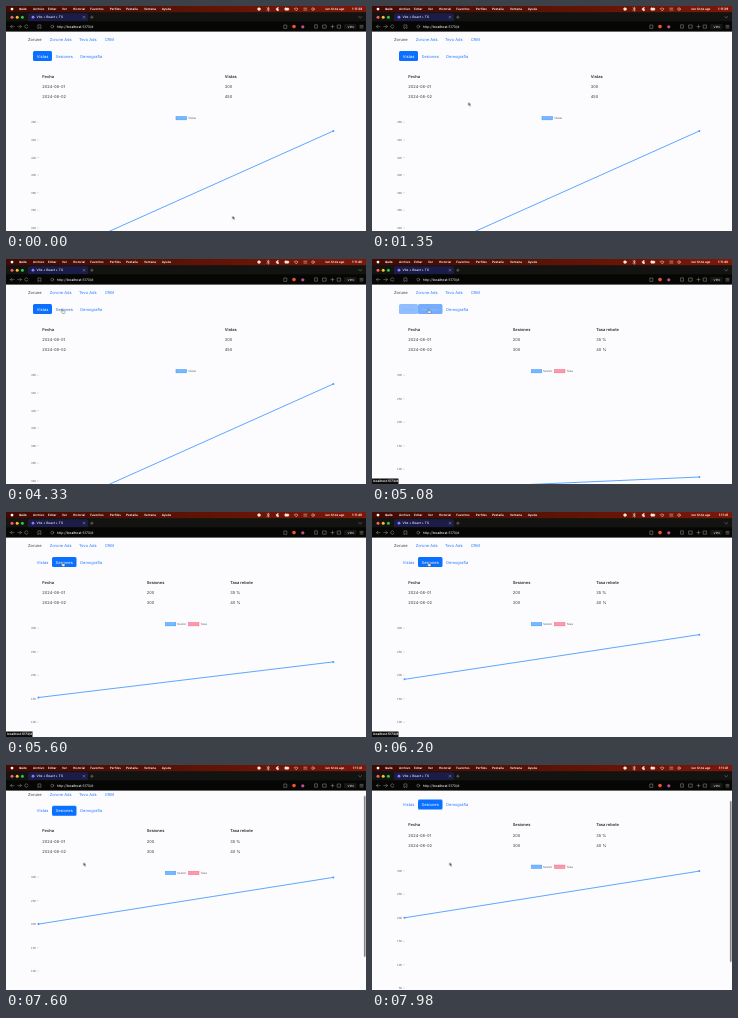
Recreate the animation shown at these times as an HTML page. Size 360 px wide and 225 px high, loop 8000 ms.

```html
<!DOCTYPE html>
<html lang="es">
<head>
<meta charset="utf-8">
<title>Panel</title>
<style>
html, body { margin: 0; height: 100%; overflow: hidden; background: #fcfcff; }
svg.stage { display: block; width: 100vw; height: 100vh; }
text { font: 4px Inter, "Open Sans", sans-serif; fill: #33373b; text-rendering: geometricPrecision; }
.link { fill: #2478fa; }
.head text { font-weight: 600; fill: #24282c; }
.chart text { font: 3px "Liberation Sans", sans-serif; fill: #666; }
.axis text { text-anchor: end; }
.axis path { stroke: #b5b5b5; stroke-width: .4; }
.bar text { font-size: 3px; font-weight: 600; fill: #fff; }
.bar .app { font-weight: 700; }
.line { fill: none; stroke: #4b9dff; stroke-width: .9; stroke-linecap: round; }
.dot { stroke-width: 2; }
.icons { fill: none; stroke: #96968f; stroke-width: .5; stroke-linecap: round; }
.bar .icons { stroke: #ffe6e0; }

/* one shared 8 s clock: 1% = 80 ms */
.anim, .anim * { animation-duration: 8s; animation-iteration-count: infinite; animation-timing-function: linear; }
.anim .step { animation-timing-function: step-end; }

.anim .page { animation-name: scroll; }
@keyframes scroll { 0%, 92% { transform: translateY(0); } 99.5%, 100% { transform: translateY(-10.5px); } }
.anim .thumb { animation-name: thumb; }
@keyframes thumb {
  0%, 91.9% { opacity: 0; transform: translateY(0); }
  92% { opacity: 1; transform: translateY(0); }
  99.5%, 100% { opacity: 1; transform: translateY(8.5px); }
}
.anim .views { animation-name: views; }
@keyframes views { 0% { visibility: visible; } 61%, 100% { visibility: hidden; } }
.anim .sessions { animation-name: sessions; }
@keyframes sessions { 0% { visibility: hidden; } 61%, 100% { visibility: visible; } }

/* both ends of the line rise from the zero level */
.anim .rise { animation-name: rise; }
.anim .riseDots { animation-name: riseDots; }
@keyframes rise {
  0% { d: path("M32.5 257L327.3 257"); }
  61.25% { d: path("M32.5 257L327.3 257"); animation-timing-function: cubic-bezier(.25, 1, .5, 1); }
  90.5%, 100% { d: path("M32.5 163.3L327.3 116.6"); }
}
@keyframes riseDots {
  0% { d: path("M32.5 257h.01M327.3 257h.01"); }
  61.25% { d: path("M32.5 257h.01M327.3 257h.01"); animation-timing-function: cubic-bezier(.25, 1, .5, 1); }
  90.5%, 100% { d: path("M32.5 163.3h.01M327.3 116.6h.01"); }
}

.anim .pill1 { animation-name: pillOut; }
.anim .pill2 { animation-name: pillIn; }
.anim .label1 { animation-name: labelOut; }
.anim .label2 { animation-name: labelIn; }
@keyframes pillOut { 0%, 61% { opacity: 1; } 65.5%, 100% { opacity: 0; } }
@keyframes pillIn { 0%, 61% { opacity: 0; } 65.5%, 100% { opacity: 1; } }
@keyframes labelOut { 0%, 61% { fill: #fff; } 65.5%, 100% { fill: #2478fa; } }
@keyframes labelIn { 0%, 41% { fill: #2478fa; } 44%, 61% { fill: #2f66b4; } 65.5%, 100% { fill: #fff; } }

.anim .status { animation-name: status; }
@keyframes status { 0% { visibility: hidden; } 56% { visibility: visible; } 89%, 100% { visibility: hidden; } }

.anim .clock { animation-name: clock; }
@keyframes clock {
  0% { transform: translateY(0); }
  15% { transform: translateY(-10px); }
  45% { transform: translateY(-20px); }
  75%, 100% { transform: translateY(-30px); }
}

.anim .cursor { animation-name: move; }
@keyframes move {
  0% { transform: translate(226.5px, 210px); }
  3.5%, 6.6% { transform: translate(211px, 189px); }
  8.6%, 11.6% { transform: translate(118px, 110px); }
  20.9%, 22.1% { transform: translate(80px, 86px); }
  27.6%, 35.5% { transform: translate(60.5px, 67px); }
  42.5% { transform: translate(56px, 50px); }
  54%, 78% { transform: translate(55.5px, 49.8px); }
  84.5% { transform: translate(75.5px, 93.5px); }
  91%, 100% { transform: translate(77.5px, 97.5px); }
}
.anim .arrow { animation-name: arrow; }
.anim .hand { animation-name: hand; }
@keyframes arrow { 0% { visibility: visible; } 40% { visibility: hidden; } 79%, 100% { visibility: visible; } }
@keyframes hand { 0% { visibility: hidden; } 40% { visibility: visible; } 79%, 100% { visibility: hidden; } }
</style>
</head>
<body>
<svg class="stage anim" viewBox="0 0 360 225" preserveAspectRatio="none">
  <defs>
    <linearGradient id="wine"><stop stop-color="#420903"/><stop offset=".5" stop-color="#5c1305"/><stop offset="1" stop-color="#7e1708"/></linearGradient>
  </defs>
  <rect width="360" height="225" fill="#fcfcff"/>

  <g class="page">
    <text x="22" y="35.4">Zorune</text>
    <g>
      <text class="link" x="43.7" y="35.4">Zorune Ads</text>
      <text class="link" x="73" y="35.4">Tevu Ads</text>
      <text class="link" x="98.7" y="35.4">CRM</text>
    </g>
    <rect class="pill1" x="27" y="45" width="19" height="10" rx="1.5" fill="#0a70ff"/>
    <rect class="pill2" x="46" y="45" width="24.5" height="10" rx="1.5" fill="#0a70ff"/>
    <text class="label1" x="36.6" y="51.5" text-anchor="middle">Vistas</text>
    <text class="label2" x="58.2" y="51.5" text-anchor="middle">Sesiones</text>
    <text class="link" x="74.2" y="51.5">Demografía</text>

    <g class="head"><text x="36.3" y="71.6">Fecha</text></g>
    <text x="36.3" y="82">2024-08-01</text>
    <text x="36.3" y="92.4">2024-08-02</text>

    <g class="views step">
      <g class="head"><text x="218.7" y="71.6">Vistas</text></g>
      <text x="218.7" y="82">300</text>
      <text x="218.7" y="92.4">450</text>
      <g class="chart">
        <rect x="170" y="110.6" width="10.5" height="3.2" fill="#76b8fc" stroke="#4b9dff" stroke-width=".6"/>
        <text x="182" y="113.2">Vistas</text>
        <g class="axis" data-top="460" data-step="20" data-gap="17.6" data-count="7"></g>
        <path class="line" d="M32.5 257L327.3 125"/>
        <path class="line dot" d="M327.3 125h.01"/>
      </g>
    </g>

    <g class="sessions step">
      <g class="head"><text x="140.7" y="71.6">Sesiones</text><text x="224.2" y="71.6">Tasa rebote</text></g>
      <text x="140.7" y="82">200</text><text x="224.2" y="82">35 %</text>
      <text x="140.7" y="92.4">300</text><text x="224.2" y="92.4">40 %</text>
      <g class="chart">
        <rect x="159.4" y="110.6" width="10.3" height="3.2" fill="#76b8fc" stroke="#4b9dff" stroke-width=".6"/>
        <text x="171" y="113.2">Sesion</text>
        <rect x="182.6" y="110.6" width="10.3" height="3.2" fill="#fb98ac" stroke="#f9708c" stroke-width=".6"/>
        <text x="194.6" y="113.2">Tasa</text>
        <g class="axis" data-top="300" data-step="50" data-gap="23.5" data-count="6"></g>
        <path class="line rise" d="M32.5 163.3L327.3 116.6"/>
        <path class="line dot riseDots" d="M32.5 163.3h.01M327.3 116.6h.01"/>
      </g>
    </g>
  </g>
  <rect class="thumb" x="357.9" y="27.5" width="1.7" height="161" rx=".8" fill="#858585"/>

  <g class="status step">
    <rect y="219.5" width="26.5" height="5.5" fill="#0c0c0a"/>
    <text x=".9" y="223.4" style="font-size:3.2px;font-weight:600;fill:#fff">localhost:5173/#</text>
  </g>

  <!-- browser frame -->
  <rect y="6" width="360" height="10" fill="#131311"/>
  <rect x="22" y="7.2" width="60" height="8" rx="1.5" fill="#1b1c48"/>
  <rect y="15.4" width="360" height="10.2" fill="#060604"/>
  <circle cx="6" cy="11.2" r="1.5" fill="#fe5f57"/>
  <circle cx="11.2" cy="11.2" r="1.5" fill="#febc2e"/>
  <circle cx="16.4" cy="11.2" r="1.5" fill="#28c840"/>
  <circle cx="27" cy="11.2" r="1.4" fill="#8f7bff"/>
  <text x="30.5" y="12.4" style="font-size:3.2px;font-weight:500;fill:#f4f4fa">Vite + React + TS</text>
  <text x="50.7" y="21.9" style="font-size:3.4px;font-weight:500;fill:#d0d0cc">http://<tspan fill="#fff">localhost</tspan>:5173/#</text>
  <g class="icons">
    <path d="M77 10.2l2 2m0-2l-2 2M84.6 11.2h2.6m-1.3-1.3v2.6M352.8 10.6l1.4 1.3 1.4-1.3"/>
    <path d="M8 20.6h-3.6l1.5-1.5m-1.5 1.5l1.5 1.5M11.8 20.6h3.6l-1.5-1.5m1.5 1.5l-1.5 1.5"/>
    <path d="M21.8 19.6a1.7 1.7 0 1 0 .2 1.5M32.3 18.9h2.6v3.6l-1.3-1-1.3 1z"/>
    <circle cx="46.3" cy="20.6" r="1.4"/>
    <path d="M277.8 22v-3h3v3zM309 18.8h2.4v3.4h-2.4zM317 19h3.2v3.2h-3.2zM325 20.6h3m-1.5-1.5v3M331.6 19h3v3.2h-3zM354 19.4h3m-3 1.3h3m-3 1.3h3"/>
  </g>
  <circle cx="288" cy="20.6" r="1.8" fill="#f4532f"/>
  <circle cx="296.8" cy="20.8" r="1.6" fill="#c0508a"/>
  <rect x="338" y="18" width="12.5" height="5.2" rx="1.2" fill="#161614"/>
  <text x="341.6" y="21.7" style="font-size:2.9px;font-weight:500;fill:#d8d8d4">VPN</text>

  <!-- menu bar -->
  <g class="bar">
    <rect width="360" height="6.2" fill="url(#wine)"/>
    <circle cx="6" cy="3.1" r="1.4" fill="#fff"/>
    <text class="app" x="13" y="4.2">Quilo</text>
    <text x="27" y="4.2">Archivo</text>
    <text x="42" y="4.2">Editar</text>
    <text x="56" y="4.2">Ver</text>
    <text x="67" y="4.2">Historial</text>
    <text x="84.3" y="4.2">Favoritos</text>
    <text x="103.8" y="4.2">Perfiles</text>
    <text x="120" y="4.2">Pestaña</text>
    <text x="138" y="4.2">Ventana</text>
    <text x="155.8" y="4.2">Ayuda</text>
    <g class="icons">
      <circle cx="253" cy="3.1" r="1.4" fill="#ffe6e0"/>
      <path d="M261 1.9l2.4 2.4-1.2 1V1l1.2 1-2.4 2.4M290 4.6l-1.7-2a2.6 2.6 0 0 1 3.4 0zM297.8 2.2h3m-3 1.8h3"/>
      <path d="M272 1.7a1.5 1.5 0 1 0 1 2.2 1.6 1.6 0 0 1-1-2.2z" fill="#ffe6e0"/>
      <rect x="278.8" y="2" width="4" height="2.2" rx=".6" fill="#ffe6e0"/>
      <circle cx="307" cy="3.1" r="1.3"/>
    </g>
    <text x="319.5" y="4.2">lun 12 de ago</text>
    <svg x="338" y="0" width="22" height="6">
      <g class="clock step" text-anchor="end"></g>
    </svg>
  </g>

  <g class="cursor">
    <g transform="scale(.85)">
      <path class="arrow step" d="M0 0v3.8l.9-.8.7 1.6.8-.4-.7-1.5h1.2z" fill="#000" stroke="#fff" stroke-width=".3"/>
      <path class="hand step" d="M.6.4q.5-.5.9 0v1.8l2.1.5q.6.3.4 1l-.5 1.8H1.2L-.4 3.4q.2-.7 1 0z" fill="#fff" stroke="#222" stroke-width=".4"/>
    </g>
  </g>
</svg>
<script>
for (const axis of document.querySelectorAll('.axis')) {
  const { top, step, gap, count } = axis.dataset;
  let out = '';
  for (let i = 0; i < count; i++) {
    const y = 116.3 + i * gap;
    out += `<text x="30" y="${y + 1}">${top - i * step}</text><path d="M31.2 ${y}h1.8"/>`;
  }
  axis.innerHTML = out;
}
document.querySelector('.clock').innerHTML = [38, 39, 40, 41]
  .map((s, i) => `<text x="18.2" y="${4.2 + i * 10}" style="font-size:3.2px">1:11:${s}</text>`).join('');
</script>
</body>
</html>
```
